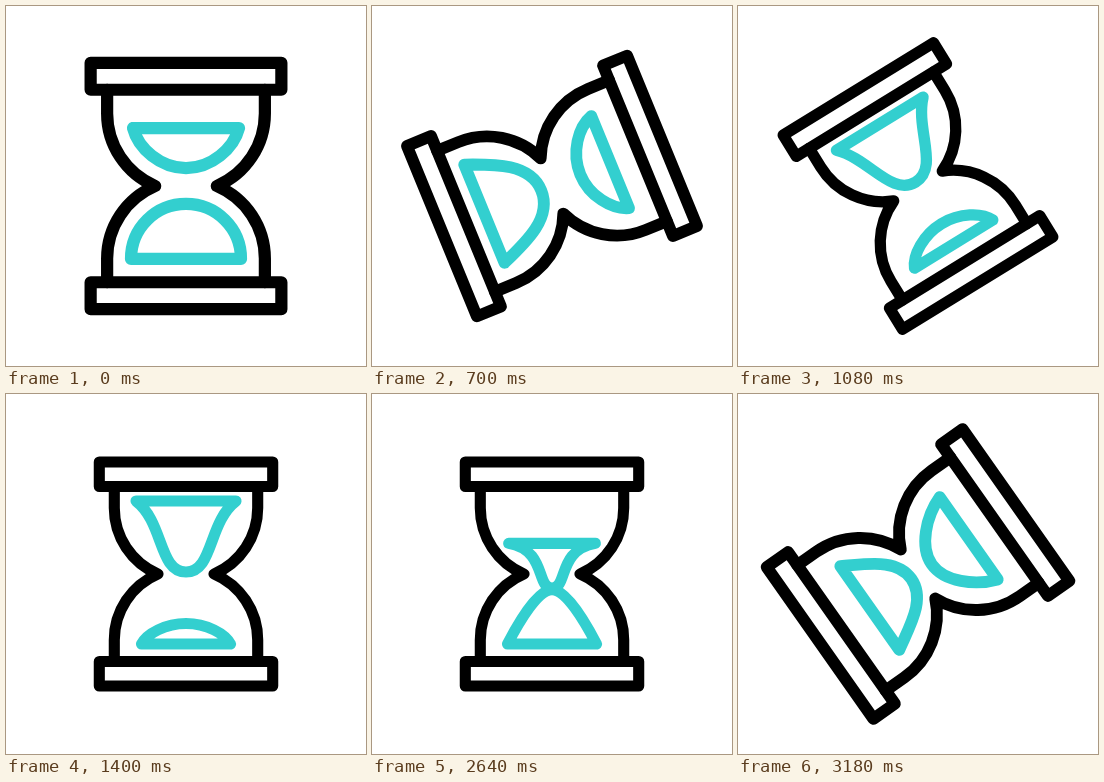
Animation, 360 px wide and 360 px high, one loop 3200 ms. Source, as an HTML page:

```html
<!DOCTYPE html>
<html lang="en">
<head>
<meta charset="utf-8">
<title>Hourglass</title>
<style>
  html, body { margin: 0; width: 100%; height: 100%; overflow: hidden; background: #fff; }
  svg { display: block; width: 100vw; height: 100vh; }
  svg * { fill: none; stroke-width: 11.1; stroke-linecap: round; stroke-linejoin: round; }
  .frame { stroke: #000; }
  .sand, .drop { stroke: #33cfcf; }
</style>
</head>
<body>
<svg viewBox="0 0 360 360">
  <g id="hourglass">
    <path class="sand" id="small"/>
    <path class="sand" id="large"/>
    <g class="frame">
      <path d="M-71.7-87.5V-66A71.7 71.7 0 0 0-28 0A71.7 71.7 0 0 0-71.7 66V87.5"/>
      <path d="M71.7-87.5V-66A71.7 71.7 0 0 1 28 0A71.7 71.7 0 0 1 71.7 66V87.5"/>
      <rect x="-86.7" y="-112" width="173.4" height="24.5"/>
      <rect x="-86.7" y="87.5" width="173.4" height="24.5"/>
    </g>
  </g>
  <path class="drop" id="drops"/>
</svg>
<script>
const LOOP = 3200, STEP = 20;
const FLIP = 200, POUR = 1400, MID = 2100, BACK = 2800, END = 3400;
const DROP_START = 1820, DROP_END = 2420, DROP_TRAVEL = 60, DROP_LENGTH = 7.5;

// width: half of the flat side; flat, tip: distances from the neck;
// side, round: how wide the curve stays near the flat side and near the tip.
const sand = (width, flat, tip, side, round) => ({ width, flat, tip, side, round });

const cap = sand(48.2, 52.7, 16.3, 0.9, 0.48);
const smallKeys = [
  [FLIP, cap],
  [POUR, sand(44.5, 70, 49.5, 0.88, 0.46)],
  [BACK, sand(44.5, 70, 14.5, 0.72, 0.31)],
  [END, cap]
];
const dome = sand(50, 66.3, 16.3, 1, 0.55);
const largeKeys = [
  [FLIP, dome],
  [POUR, sand(50, 73, 2, 0.44, 0.55)],
  [MID, sand(45.5, 38, -27, 0, 0.44)],
  [BACK, sand(43, 29.5, -12, 0.13, 0.37)],
  [END, dome]
];

const byId = id => document.getElementById(id);
const mix = (a, b, k) => a + (b - a) * k;

function ease(time, from, to) {
  const k = Math.min(1, Math.max(0, (time - from) / (to - from)));
  return k * k * (3 - 2 * k);
}

function pose(keys, time) {
  let i = 0;
  while (i < keys.length - 2 && time >= keys[i + 1][0]) i++;
  const [from, a] = keys[i], [to, b] = keys[i + 1];
  const k = ease(time, from, to), result = {};
  for (const name in a) result[name] = mix(a[name], b[name], k);
  return result;
}

function outline({ width, flat, tip, side, round }, up) {
  const shoulder = mix(flat, tip, 0.1 + 0.46 * side);
  const point = (x, distance) => `${(x * width).toFixed(2)} ${(distance * up).toFixed(2)} `;
  return "M" + point(1, flat) +
    "C" + point(side, shoulder) + point(round, tip) + point(0, tip) +
    "C" + point(-round, tip) + point(-side, shoulder) + point(-1, flat) + "Z";
}

function dropPath(time) {
  if (time <= DROP_START || time >= DROP_END) return "";
  const shift = (ease(time, DROP_START, DROP_END) - 0.5) * DROP_TRAVEL - DROP_LENGTH / 2;
  const pair = (x, y) => [-x, x].map(dx => `M${180 + dx} ${y + shift}v${DROP_LENGTH}`).join("");
  return pair(112, 125) + pair(133.5, 190);
}

function draw(time) {
  const turn = ease(time, FLIP, POUR) - ease(time, BACK, END);
  byId("hourglass").setAttribute("transform",
    `translate(180 180) rotate(${180 * turn}) scale(${1.1 - 0.1 * turn})`);
  byId("small").setAttribute("d", outline(pose(smallKeys, time), -1));
  byId("large").setAttribute("d", outline(pose(largeKeys, time), 1));
  byId("drops").setAttribute("d", dropPath(time));
}

function tick() {
  draw(Math.floor(performance.now() / STEP) * STEP % LOOP);
  requestAnimationFrame(tick);
}
tick();
</script>
</body>
</html>
```
